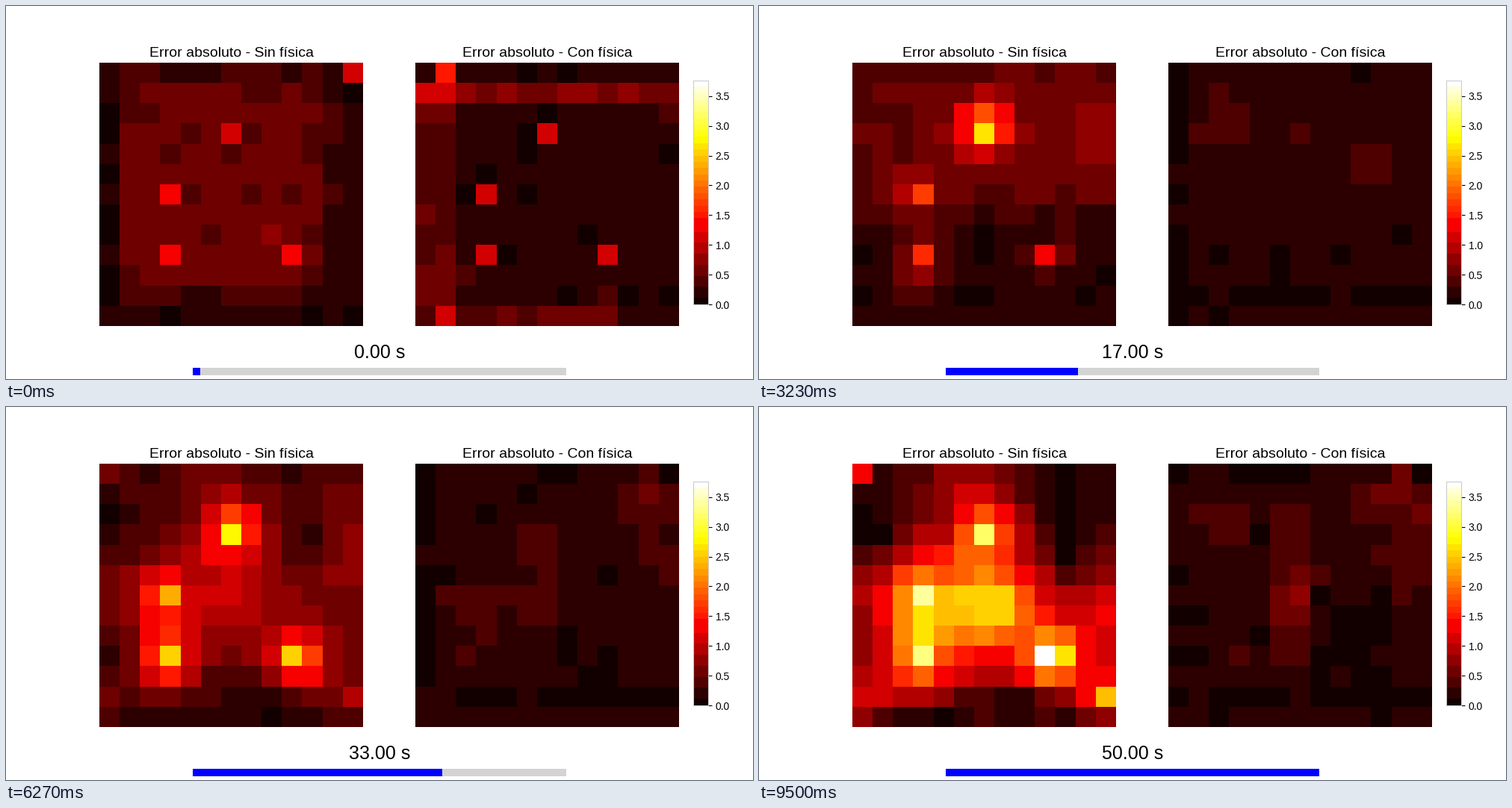
These frames come from a looping animation (1000 px wide and 500 px high, 9690 ms). A matplotlib script:

```python
import numpy as np
import matplotlib.pyplot as plt
from matplotlib.animation import FuncAnimation
from matplotlib.colors import BoundaryNorm, ListedColormap
from matplotlib.patches import Rectangle

plt.rcParams["font.family"] = "Liberation Sans"

W, H, DPI = 1000, 500, 100
FRAMES, STEP = 51, 190
N = 13
VMAX = 3.76
ROW, COL = np.mgrid[0:N, 0:N]
SOURCES = ((3, 6), (6, 3), (9, 3), (9, 9))

rng = np.random.default_rng(11)
NOISE = rng.normal(0, 0.06, (2, 12, N, N))


def bump(r, c, sr, sc, p=2):
    """Gaussian hill; a larger p flattens it towards a box."""
    return np.exp(-0.5 * (np.abs(ROW - r) / sr) ** p
                  - 0.5 * (np.abs(COL - c) / sc) ** p)


def cell(r, c):
    return bump(r, c, 0.3, 0.3)


def ramp(t, start, stop):
    return np.clip((t - start) / (stop - start), 0, 1)


def pulse(t, start, peak, stop):
    return ramp(t, start, peak) * (1 - ramp(t, peak, stop))


def grain(panel, t):
    """Noise that drifts to a new pattern every five seconds."""
    k, u = int(t // 5), t % 5 / 5
    return NOISE[panel, k] * (1 - u) + NOISE[panel, k + 1] * u


def error_plain(t):
    early, late = 1 - ramp(t, 0, 9), ramp(t, 24, 50)
    swell = pulse(t, 0, 9, 17)
    z = 0.15 + grain(0, t)

    # plateau at the start, then a band over the upper half
    z += early * (0.4 * bump(5.5, 5.5, 5.2, 5, 12) + cell(0, 12)
                  + 0.15 * bump(7.5, 1, 2.6, 0.4) - 0.5 * cell(7.5, 3)
                  - 0.15 * bump(5.5, 0, 4, 0.4))
    z += 0.4 * pulse(t, 0, 9, 38) ** 0.5 * bump(3.2, 6, 3.6, 7, 10)
    z += swell * (0.55 * bump(0, 5.5, 1.2, 3) + 0.4 * bump(5, 0, 3, 0.5)
                  + 0.5 * bump(7, 12, 3.3, 0.5) - 0.3 * bump(4, 4.3, 1, 0.8)
                  - 0.4 * bump(1.5, 11.5, 1, 1))
    z += 0.5 * pulse(t, 9, 23, 55) * bump(2.8, 11.7, 1.8, 1.3)

    # sources: a bright core inside a growing halo
    z += 0.7 * sum(cell(r, c) for r, c in SOURCES)
    z += 1.6 * ramp(t, 7, 17) * bump(2.7, 6.05, 1, 1)
    z += 0.7 * ramp(t, 9, 17) * bump(5.8, 2.6, 0.8, 0.7)
    z += 0.5 * ramp(t, 15, 23) * bump(7.5, 2.6, 1, 0.9)
    z += 1.3 * ramp(t, 7, 25) * bump(9.4, 2.8, 1, 0.85)
    z += 2.3 * ramp(t, 12, 41) * bump(9.1, 9.4, 1, 0.95)

    # central mound and borders growing late, with hollows between them
    z += late * (2.2 * bump(6.6, 4.9, 2.5, 3.3)
                 + 0.6 * bump(0.2, 5.2, 0.9, 1.7)
                 + 1.2 * cell(0, 0)
                 + 2.0 * bump(10.9, 12.1, 0.6, 0.8)
                 + 0.8 * bump(7.5, 12, 2.5, 1.3)
                 + 0.9 * bump(11, 0.2, 0.9, 1.1)
                 + 0.8 * late * bump(6.4, 6.7, 0.8, 0.9)
                 - 0.6 * bump(3.5, 10, 1.4, 0.8)
                 - 0.5 * bump(2.8, 0.3, 1, 1)
                 - 0.4 * bump(11, 7, 0.6, 0.9)
                 - 0.3 * bump(12, 3, 0.4, 1.2))
    return np.clip(z, 0, 3.75)


def error_physics(t):
    early, late = 1 - ramp(t, 0, 9), ramp(t, 20, 40)
    z = 0.18 + grain(1, t)

    # bright top row and left columns at the start
    z += early * (0.5 * bump(1, 6, 0.4, 7, 6) + 0.25 * bump(6, 0.4, 5, 0.7, 4)
                  + 0.45 * bump(1.5, 0.6, 0.8, 0.6) + 1.1 * cell(0, 1)
                  + 0.38 * bump(12, 6, 0.4, 3.4, 12) + 0.8 * cell(12, 1)
                  + 0.3 * bump(10.5, 0.7, 0.7, 0.9))
    z += 0.9 * early * sum(cell(r, c) for r, c in SOURCES)

    # faint halos that fade around the sources
    fade = pulse(t, 0, 9, 17)
    z += 0.42 * fade * sum(bump(r, c, 0.8, 1) for r, c in SOURCES)
    z += 0.3 * pulse(t, 9, 18, 33) * (bump(5, 9.4, 1.2, 0.9)
                                      + bump(2.4, 2.5, 0.9, 0.9))

    # dark left and lower edges, dark gap right of the centre
    z -= 0.12 * ramp(t, 0, 9) * bump(6, 0, 6, 0.6, 4)
    z -= 0.12 * ramp(t, 0, 9) * bump(11, 6, 0.6, 7, 6)
    z -= 0.14 * late * (bump(8.7, 8.5, 1.9, 1.5, 4)
                        + bump(0.4, 5.2, 0.8, 1.6, 4))

    # settled pattern: top right corner, right edge, centre, left patch
    z += late * (0.4 * bump(0.9, 11, 1, 1.5) + 0.25 * bump(4, 11.7, 1.7, 0.9)
                 + 0.26 * bump(5, 5.6, 3, 0.9, 4)
                 + 0.3 * bump(11, 0.6, 0.3, 0.6) - 0.4 * cell(0, 12))
    z += 0.4 * pulse(t, 22, 38, 52) * bump(7.4, 2.7, 1.4, 0.7)
    z += 0.25 * ramp(t, 43, 50) * (bump(6.8, 5.5, 1, 0.7)
                                   + bump(2.6, 2, 1, 1))
    return np.clip(z, 0, 3.75)


def px_axes(x, y, w, h):
    return fig.add_axes([x / W, 1 - (y + h) / H, w / W, h / H])


def heatmap(x, title, field):
    ax = px_axes(x, 76, 353, 353)
    im = ax.imshow(field(0), cmap=cmap, norm=norm,
                   interpolation="nearest", aspect="auto")
    ax.set_title(title, fontsize=14)
    ax.axis("off")
    return im


# wide steps through the dark reds, finer ones above
bounds = np.r_[0, np.linspace(0.11, 1.22, 7), np.linspace(1.45, VMAX, 23)]
mids = (bounds[:-1] + bounds[1:]) / 2
shades = plt.get_cmap("hot")(mids / VMAX)
shades[-1] = 1
cmap = ListedColormap(shades)
norm = BoundaryNorm(bounds, len(mids))

fig = plt.figure(figsize=(W / DPI, H / DPI), dpi=DPI, facecolor="white")
plain = heatmap(125, "Error absoluto - Sin física", error_plain)
physics = heatmap(548, "Error absoluto - Con física", error_physics)

bar = fig.colorbar(plain, cax=px_axes(920, 100, 20, 300),
                   spacing="proportional", ticks=np.arange(0, 3.6, 0.5),
                   format="%.1f")
bar.ax.minorticks_off()
bar.ax.tick_params(labelsize=10)
bar.outline.set_edgecolor("#cccccc")
bar.outline.set_linewidth(0.8)

stage = px_axes(0, 0, W, H)
stage.set(xlim=(0, W), ylim=(H, 0))
stage.axis("off")
clock = stage.text(500, 472, "", fontsize=18, ha="center", va="baseline")
stage.add_patch(Rectangle((250, 485), 500, 10, color="lightgrey", lw=0))
done = stage.add_patch(Rectangle((250, 485), 0, 10, color="blue", lw=0))


def update(i):
    plain.set_data(error_plain(i))
    physics.set_data(error_physics(i))
    clock.set_text(f"{i:.2f} s")
    done.set_width(np.ceil(500 * (i + 1) / FRAMES))
    return plain, physics, clock, done


anim = FuncAnimation(fig, update, frames=FRAMES, interval=STEP,
                     repeat=True, repeat_delay=0)
plt.show()
```
